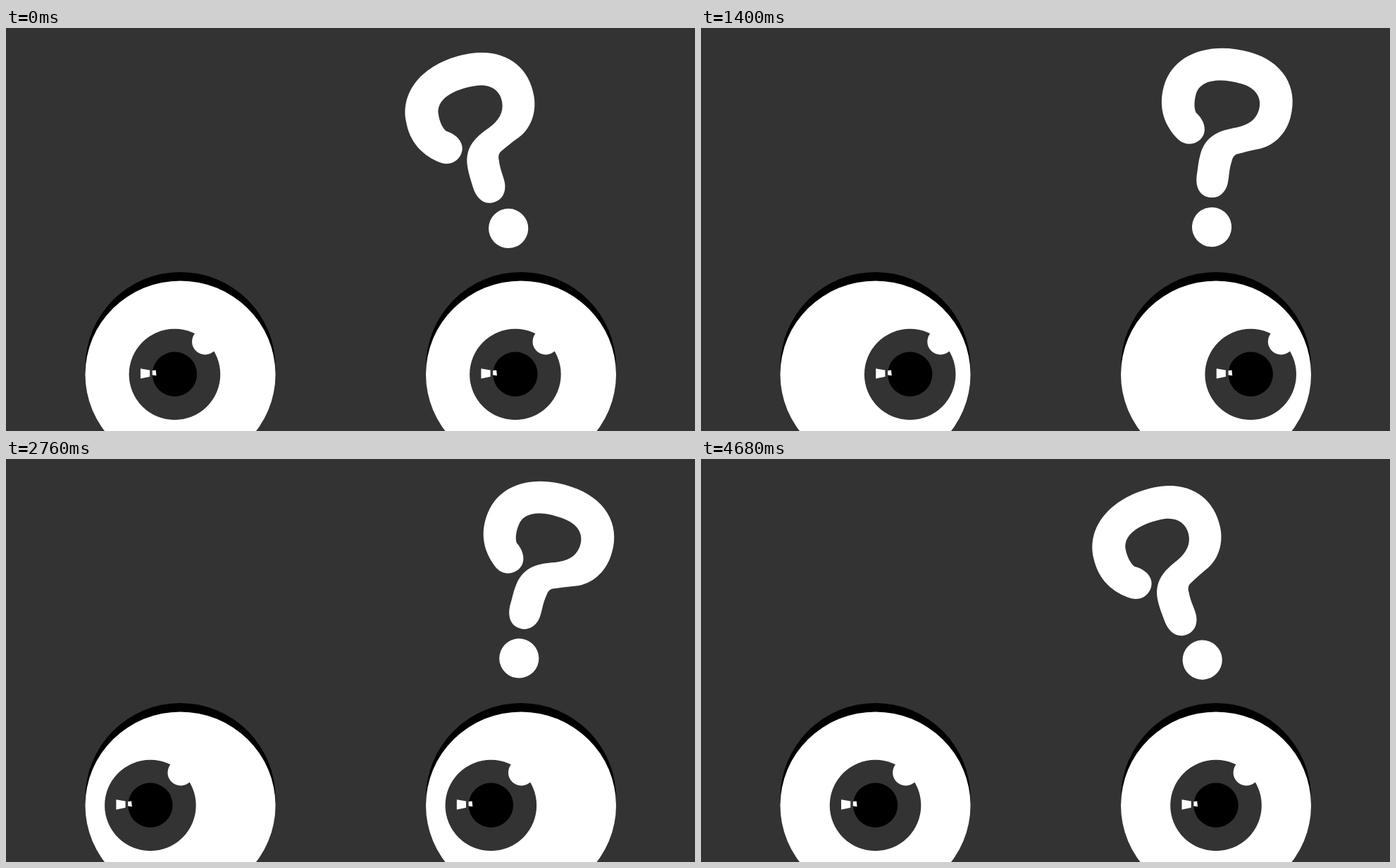
Recreate the animation shown at these times as an HTML page with a canvas. Size 978x573 px, loop 4720 ms.

```html
<!DOCTYPE html>
<html lang="en">
<head>
<meta charset="utf-8">
<title>Puzzled eyes</title>
<style>
html, body { margin: 0; width: 100%; height: 100%; overflow: hidden; background: #333; }
canvas { display: block; }
</style>
</head>
<body>
<canvas id="stage" width="978" height="573"></canvas>
<script>
const ctx = document.getElementById('stage').getContext('2d');
const LOOP = 4720, STEP = 40;
const GREY = '#333', WHITE = '#fff', BLACK = '#000';
const EYES = [247.5, 731];
const EYE_Y = 492.5;
const PIVOT = { x: 723.5, y: 311 };
const HOOK_LEAN = -12.5; // lean at which the hook outline is drawn

const hook = new Path2D(`M652 133 C647 127 645 117 645 108
  C645 86 671 76 703 76 C725 76 737 88 737 105
  C737 120 728 130 713 138 C692 148 674 160 674 188
  C674 200 676 208 677 218 C679 233 687 244 700 244
  C715 244 723 232 722.5 218 C722 207 719 200 719.5 186
  C719 180 721 176 724 174 C733 169 741 164 749 160
  C771 150 783 128 783 104 C783 58 750 29.5 703 29.5
  C645 29.5 598 60 598 109 C598 141 614 163 638 176.5
  C655 185 671 172 671 158 C671 147 662 138 652 133 Z`);

// [time in ms, value]
const LEAN = [[-40, -25], [1120, 25], [2240, -25], [3400, 25], [4680, -25]];
const GAZE = [[-40, 0], [610, -67.8], [1865, 67.8], [3437, -67.8], [4122, 0]];

const easeOut = x => 1 - (1 - x) ** 2;

function valueAt(keys, time) {
  for (let i = 1; i < keys.length; i++) {
    const [t0, v0] = keys[i - 1], [t1, v1] = keys[i];
    if (time < t1) return v0 + (v1 - v0) * easeOut((time - t0) / (t1 - t0));
  }
  return keys[keys.length - 1][1];
}

function ellipse(color, x, y, rx, ry = rx) {
  ctx.fillStyle = color;
  ctx.beginPath();
  ctx.ellipse(x, y, rx, ry, 0, 0, Math.PI * 2);
  ctx.fill();
}

function polygon(color, points) {
  ctx.fillStyle = color;
  ctx.beginPath();
  points.forEach(([x, y]) => ctx.lineTo(x, y));
  ctx.fill();
}

function drawEye(x, gaze) {
  ctx.save();
  ctx.translate(x, EYE_Y);
  ellipse(BLACK, 0, -10.5, 135);
  ellipse(WHITE, 0, 0, 135, 133);
  ctx.translate(gaze, 0);
  ellipse(GREY, 0, 0, 64.8);
  ellipse(BLACK, 0, -0.3, 31.7);
  ellipse(WHITE, 43.2, -46.6, 18.6);
  polygon(WHITE, [[-48.5, -8.3], [-35.3, -5.9], [-35.3, 3.2], [-48.5, 6]]);
  polygon(WHITE, [[-31.7, -5.4], [-26.8, -5.9], [-26, 1.8], [-31.7, 1]]);
  ctx.restore();
}

function drawQuestion(lean) {
  const toRad = Math.PI / 180;
  ctx.save();
  ctx.translate(PIVOT.x, PIVOT.y);
  ctx.rotate(lean * toRad);
  ellipse(WHITE, 0, -28, 28.1);
  ctx.rotate(-HOOK_LEAN * toRad);
  ctx.translate(-PIVOT.x, -PIVOT.y);
  ctx.fill(hook);
  ctx.restore();
}

function draw(now) {
  const time = Math.floor((now % LOOP) / STEP) * STEP;
  ctx.fillStyle = GREY;
  ctx.fillRect(0, 0, 978, 573);
  const gaze = valueAt(GAZE, time);
  EYES.forEach(x => drawEye(x, gaze));
  drawQuestion(valueAt(LEAN, time));
}

const start = performance.now();
function tick() {
  draw(performance.now() - start);
  requestAnimationFrame(tick);
}
tick();
</script>
</body>
</html>
```
